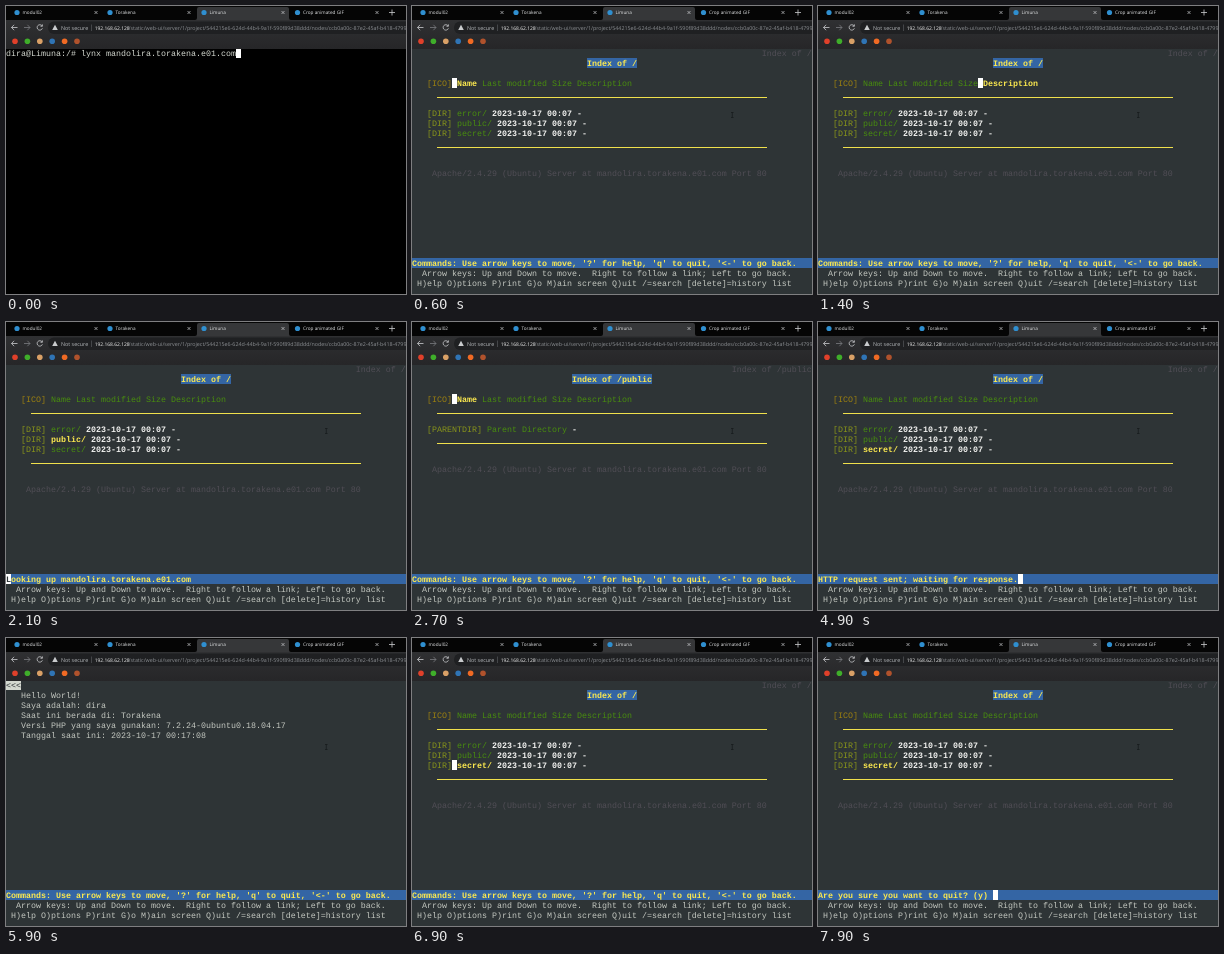
Animation of 400 by 288 pixels, one loop 8 s. Source, as an HTML page:

```html
<!DOCTYPE html>
<html lang="en">
<head>
<meta charset="utf-8">
<title>Terminal browser</title>
<style>
  html, body { margin: 0; width: 100%; height: 100%; overflow: hidden; background: #000; }
  #stage { position: absolute; left: 0; top: 0; width: 400px; height: 288px; overflow: hidden; }
  svg { position: absolute; left: 0; top: 0; }
  svg text { font-family: "Open Sans", "Noto Sans", sans-serif; font-size: 4.7px; fill: #e4e6e8; text-rendering: geometricPrecision; }
  #term {
    position: absolute; left: 0; top: 42px; width: 400px; height: 246px;
    background: #2e3436; color: #c4c8c1;
    font: 8.332px "Liberation Mono", monospace; text-rendering: geometricPrecision;
  }
  #term.shell { background: #000; color: #d3d7cf; }
  #term div { height: 10px; line-height: 12px; white-space: pre; }
  #term .bar { background: #3465a4; color: #fce94f; font-weight: bold; }
  .cur, .hl, .mark, .rule { display: inline-block; height: 10px; vertical-align: top; }
  .cur { background: #fff; color: #2e3436; }
  .mark { background: #d3d7cf; color: #2e3436; }
  .hl { background: #3465a4; color: #fce94f; font-weight: bold; }
  .rule { box-sizing: border-box; width: 330px; border-bottom: 1px solid #f0e04c; }
  .dim { color: #514e56; }
  .ico { color: #9c8010; }
  .dir { color: #89951a; }
  .link { color: #498e0e; }
  .sel { color: #fce94f; font-weight: bold; }
  .date { color: #f2f2f0; font-weight: bold; }
</style>
</head>
<body>
<div id="stage">
  <div id="term"></div>
  <svg width="400" height="288" viewBox="0 0 400 288">
    <linearGradient id="bar" x2="0" y2="1">
      <stop stop-color="#343537"/>
      <stop offset="1" stop-color="#262628"/>
    </linearGradient>
    <rect width="400" height="43" fill="url(#bar)"/>
    <rect width="400" height="14" fill="#050505"/>
    <path d="M189 14q2 0 2-2V3q0-2 2-2h88q2 0 2 2v9q0 2 2 2z" fill="#363739"/>
    <rect x="42" y="15.500" width="364" height="12.500" rx="6" fill="#1f2022"/>
    <g id="tabs"></g>
    <g fill="none" stroke="#c9cbcd" stroke-width=".8">
      <path d="M386 3.500v6M383 6.500h6"/>
      <path d="M11.500 21.500h-6M8.100 18.800l-2.600 2.700 2.600 2.700"/>
      <path d="M18 21.500h6M21.400 18.800l2.600 2.700-2.600 2.700" stroke="#7a7c7f"/>
      <path d="M36 19.800A2.700 2.700 0 1 0 36.400 22.300M36.400 18.400v1.900h-1.900"/>
    </g>
    <path d="M49 18.800l2.800 5.200h-5.600z" fill="#c9cbcd"/>
    <text x="55" y="23.600" style="font-size:5.4px;fill:#b5b8bb">Not secure</text>
    <path d="M85.500 18.500v6.500" stroke="#55585b" stroke-width=".7"/>
    <text x="88.700" y="23.600" style="font-size:4.95px;fill:#f2f2f2">192.168.62.128</text>
    <text x="122.500" y="23.600" style="font-size:5.35px;fill:#8b8e92">/static/web-ui/server/1/project/544215e6-624d-44b4-9a1f-590f89d38ddd/nodes/ccb0a00c-87e2-45af-b418-4799</text>
    <g id="marks"></g>
    <path id="mouse" d="M319 106.500h2.600M320.300 106.500v5M319 111.500h2.600" stroke="#15191b" stroke-width=".7" fill="none"/>
  </svg>
</div>
<script>
const LOOP = 8000;
const HOST = 'mandolira.torakena.e01.com';
const term = document.getElementById('term');
const mouse = document.getElementById('mouse');

// Browser chrome
document.getElementById('tabs').innerHTML =
  [[10, 'modul02', 90], [103, 'Torakena', 183], [197, 'Limuna', 277], [290.500, 'Crop animated GIF', 371]]
    .map(([x, name, close]) =>
      `<circle cx="${x + 1}" cy="6.500" r="2.600" fill="#2f8fd0"/>
       <text x="${x + 6.5}" y="8.200">${name}</text>
       <path d="M${close - 1.5} 5l3 3m0-3l-3 3" stroke="#c9cbcd" stroke-width=".7"/>`)
    .join('');
document.getElementById('marks').innerHTML =
  ['#e0402a', '#3fae2a', '#d9a066', '#2f74b5', '#f06a24', '#b0522c']
    .map((c, i) => `<circle cx="${9 + i * 12.4}" cy="35.200" r="2.800" fill="${c}"/>`)
    .join('');

const esc = s => s.replace(/&/g, '&amp;').replace(/</g, '&lt;');
const span = (cls, s) => `<span class="${cls}">${esc(s)}</span>`;
const pad = n => ' '.repeat(n);

// Status line messages; cur is the column of the text cursor
const HELP = { text: "Commands: Use arrow keys to move, '?' for help, 'q' to quit, '<-' to go back." };
const LOOKUP = { text: `Looking up ${HOST}`, cur: 0 };
const WAIT = { text: 'HTTP request sent; waiting for response.', cur: 40 };
const QUIT = { text: 'Are you sure you want to quit? (y) ', cur: 35 };

function statusBar({ text, cur }) {
  const s = text.padEnd(80);
  if (cur === undefined) return esc(s);
  return esc(s.slice(0, cur)) + span('cur', s[cur]) + esc(s.slice(cur + 1));
}

function listing(path, items, sel, status) {
  const title = 'Index of ' + path;
  const rows = [];
  let n = 0;
  const link = s => {
    const on = n++ === sel;
    return (on && status === HELP ? span('cur', ' ') : ' ') + span(on ? 'sel' : 'link', s);
  };
  const rule = pad(5) + '<span class="rule"></span>';
  rows[0] = pad(80 - title.length) + span('dim', title);
  rows[1] = pad((80 - title.length) >> 1) + span('hl', title);
  rows[3] = pad(3) + span('ico', '[ICO]') + ['Name', 'Last modified', 'Size', 'Description'].map(link).join('');
  rows[4] = rule;
  items.forEach(([tag, name, info], i) => {
    rows[6 + i] = pad(3) + span('dir', tag) + link(name) + ' ' + span('date', info);
  });
  const end = 6 + items.length;
  rows[end] = rule;
  rows[end + 3] = pad(4) + span('dim', `Apache/2.4.29 (Ubuntu) Server at ${HOST} Port 80`);
  return { rows, status };
}

const DATE = '2023-10-17 00:07 -';
const top3 = ['error/', 'public/', 'secret/'].map(name => ['[DIR]', name, DATE]);
const home = (sel, status = HELP) => listing('/', top3, sel, status);
const folder = () => listing('/public', [['[PARENTDIR]', 'Parent Directory', '-']], 0, HELP);
const blank = status => ({ rows: [], status });
const shell = { shell: true, rows: [`dira@Limuna:/# lynx ${HOST}` + span('cur', ' ')] };
const secret = {
  status: HELP,
  rows: [span('mark', '<<<')].concat([
    'Hello World!',
    'Saya adalah: dira',
    'Saat ini berada di: Torakena',
    'Versi PHP yang saya gunakan: 7.2.24-0ubuntu0.18.04.17',
    'Tanggal saat ini: 2023-10-17 00:17:08'
  ].map(s => pad(3) + s))
};

// Header links are 0-3, directories 4-6
const timeline = [
  [0, shell], [200, blank(LOOKUP)], [300, blank(WAIT)], [400, home(0)],
  [1100, home(1)], [1300, home(2)], [1400, home(3)], [1600, home(4)], [1800, home(5)],
  [2000, home(5, LOOKUP)], [2200, home(5, WAIT)], [2300, folder()],
  [3200, home(5)], [4300, home(6)], [4900, home(6, WAIT)],
  [5000, secret], [6100, home(6)], [7500, home(6, QUIT)]
];

function draw({ rows, status, shell }) {
  const lines = Array.from({ length: 24 }, (_, i) => `<div>${rows[i] || ''}</div>`);
  if (status) {
    lines[21] = `<div class="bar">${statusBar(status)}</div>`;
    lines[22] = '<div>  Arrow keys: Up and Down to move.  Right to follow a link; Left to go back.</div>';
    lines[23] = '<div> H)elp O)ptions P)rint G)o M)ain screen Q)uit /=search [delete]=history list</div>';
  }
  term.className = shell ? 'shell' : '';
  mouse.style.visibility = shell ? 'hidden' : 'visible';
  term.innerHTML = lines.join('');
}

let shown = null;
function tick() {
  const t = performance.now() % LOOP;
  const now = timeline.filter(([at]) => at <= t).pop()[1];
  if (now !== shown) draw(shown = now);
  requestAnimationFrame(tick);
}
tick();
</script>
</body>
</html>
```
